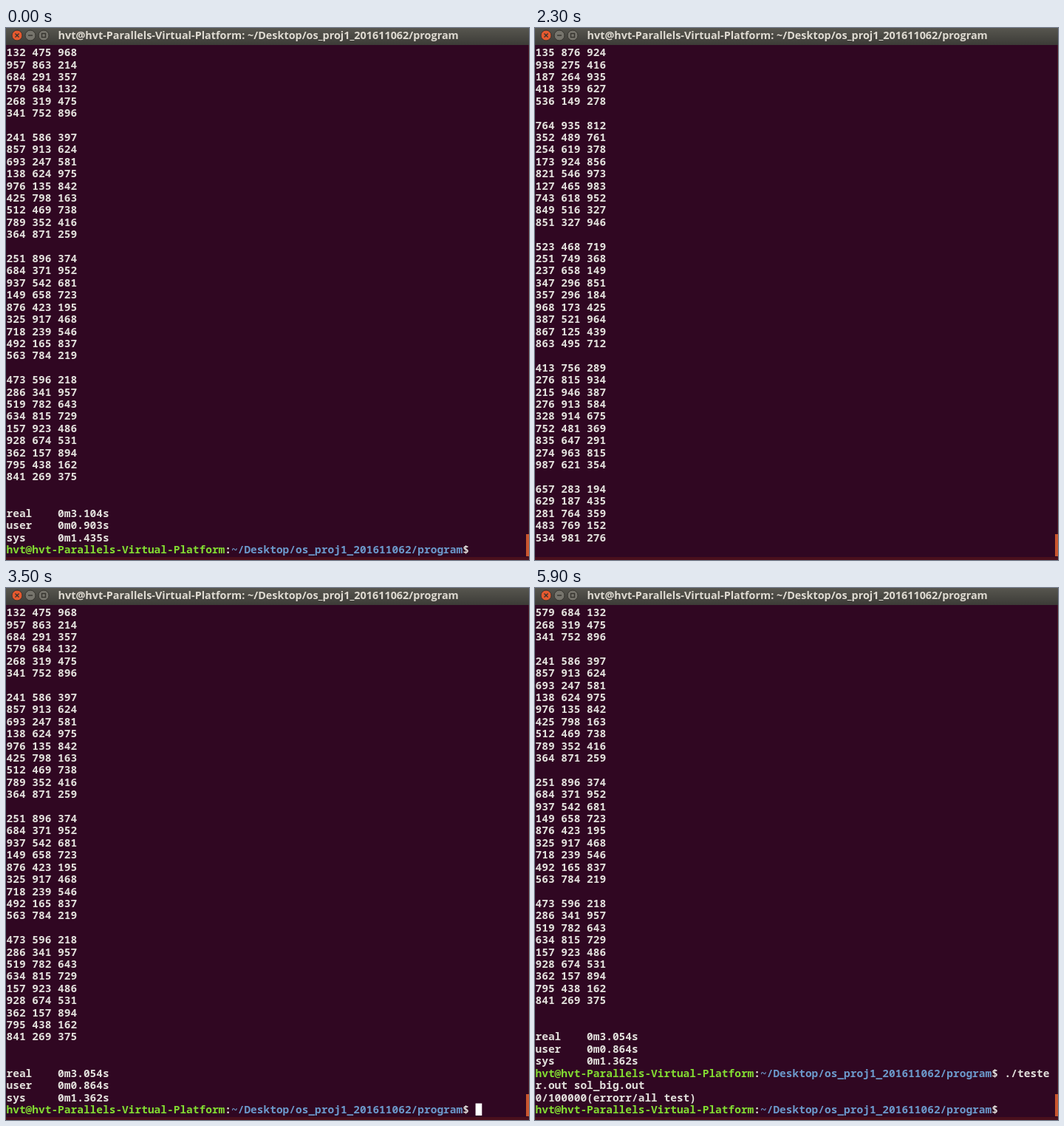
Write an HTML page with a canvas that moves like this. It is 708 px wide and 720 px high and loops after 6000 ms.

```html
<!DOCTYPE html>
<html lang="en">
<head>
<meta charset="utf-8">
<title>Terminal</title>
<style>
html, body { margin: 0; width: 100%; height: 100%; overflow: hidden; background: #300a24; }
canvas { display: block; }
</style>
</head>
<body>
<canvas id="stage" width="708" height="720"></canvas>
<script>
const ctx = document.getElementById('stage').getContext('2d');
const LOOP = 6000, STEP = 100;
const ROWS = 42, COLS = 80, CELL_W = 8.7, CELL_H = 16.41, LEFT = 0.5, TOP = 24.7;
const TEXT = '#e2e0dc', GREEN = '#83dd32', BLUE = '#6c99cb';
const MONO = '"Noto Sans Mono", "DejaVu Sans Mono", monospace';

const USER = 'hvt@hvt-Parallels-Virtual-Platform';
const FOLDER = '~/Desktop/os_proj1_201611062/program';
const PROMPT = `${USER}:${FOLDER}$ `;
const RUN = 'time ./os_proj1_201611062 <prob_big.out';
const TEST = './tester.out sol_big.out';

const solved = `132 475 968
957 863 214
684 291 357
579 684 132
268 319 475
341 752 896

241 586 397
857 913 624
693 247 581
138 624 975
976 135 842
425 798 163
512 469 738
789 352 416
364 871 259

251 896 374
684 371 952
937 542 681
149 658 723
876 423 195
325 917 468
718 239 546
492 165 837
563 784 219

473 596 218
286 341 957
519 782 643
634 815 729
157 923 486
928 674 531
362 157 894
795 438 162
841 269 375`.split('\n');

const report = (real, user, sys) => [
  ...solved, '', '',
  `real    0m${real}s`, `user    0m${user}s`, `sys     0m${sys}s`
];
const firstRun = report('3.104', '0.903', '1.435');
const secondRun = report('3.054', '0.864', '1.362');

const wrap = line => line.match(new RegExp(`.{1,${COLS}}`, 'g'));
const typed = (text, t, from, to) =>
  text.slice(0, Math.max(0, Math.floor(text.length * (t - from) / (to - from))));

function seeded(seed) {
  let s = seed * 7919 + 17;
  return () => (s = (s * 16807) % 2147483647) / 2147483647;
}

// One row of a solved grid: the digits 1 to 9 in random order
function gridRow(random) {
  const digits = [...'123456789'];
  for (let i = 8; i > 0; i--) {
    const j = Math.floor(random() * (i + 1));
    [digits[i], digits[j]] = [digits[j], digits[i]];
  }
  return digits.join('').replace(/(...)(?=.)/g, '$1 ');
}

// A screenful of the fast output: nine rows, then a blank one
function flood(t) {
  const step = t / STEP, random = seeded(step);
  const shift = Math.floor(6.9 * step + 6.3);
  const lines = [];
  for (let row = 0; row < ROWS - 1; row++) {
    const line = gridRow(random);
    lines.push((shift + row + 9) % 10 === 9 ? '' : line);
  }
  return [...lines, ''];
}

function screenLines(t) {
  if (t < 2000) return [...firstRun, ...wrap(PROMPT + typed(RUN, t, 300, 1400))];
  if (t < 3400) return flood(t);
  const command = wrap(PROMPT + typed(TEST, t, 3500, 4100));
  if (t < 4600) return [...secondRun, ...command];
  return [...secondRun, ...command, '0/100000(errorr/all test)', PROMPT];
}

function cursorOn(t) {
  const typing = (t >= 300 && t < 1500) || (t >= 3500 && t < 4300);
  return typing || (t >= 300 && t % 600 < 300);
}

function put(text, col, row, color, weight = 600) {
  ctx.font = `${weight} 14.5px ${MONO}`;
  ctx.fillStyle = color;
  ctx.fillText(text, LEFT + col * CELL_W, TOP + row * CELL_H + 13.4);
}

function drawLine(line, row) {
  if (!line.startsWith(PROMPT)) return put(line, 0, row, TEXT);
  const folderCol = USER.length + 1, endCol = folderCol + FOLDER.length;
  put(USER, 0, row, GREEN, 700);
  put(':', USER.length, row, TEXT);
  put(FOLDER, folderCol, row, BLUE, 700);
  put(line.slice(endCol), endCol, row, TEXT);
}

function box(color, x, y, w, h) {
  ctx.fillStyle = color;
  ctx.fillRect(x, y, w, h);
}

function button(x, color, symbol) {
  ctx.fillStyle = color;
  ctx.strokeStyle = '#35332e';
  ctx.lineWidth = 1;
  ctx.beginPath();
  ctx.arc(x, 10, 7, 0, Math.PI * 2);
  ctx.fill();
  ctx.stroke();
  ctx.lineWidth = 1.4;
  ctx.stroke(new Path2D(`M${x} 10${symbol}`));
}

function drawFrame() {
  const bar = ctx.createLinearGradient(0, 0, 0, 23);
  bar.addColorStop(0, '#57564f');
  bar.addColorStop(1, '#3c3b37');
  box(bar, 0, 0, 708, 23);
  button(15, '#e5592f', 'm-2.5-2.5l5 5m0-5l-5 5');
  button(33, '#76746c', 'm-3 0h6');
  button(51, '#76746c', 'm-2.5-2.5h5v5h-5z');
  ctx.font = 'bold 14.4px "Open Sans", "Noto Sans", sans-serif';
  ctx.fillStyle = '#dfdbd2';
  ctx.fillText(`${USER}: ${FOLDER}`, 70.5, 15.3);

  box('#4d1720', 707, 23, 1, 697);
  box('#4a101d', 0, 716, 708, 4);
  box('#c9562f', 704, 685, 4, 30);
}

function draw() {
  const t = Math.floor(performance.now() % LOOP / STEP) * STEP;
  box('#300722', 0, 0, 708, 720);
  const lines = screenLines(t).slice(-ROWS);
  lines.forEach(drawLine);
  if (cursorOn(t)) {
    const row = lines.length - 1;
    box('#fff', LEFT + lines[row].length * CELL_W, TOP + row * CELL_H, CELL_W, CELL_H);
  }
  drawFrame();
  requestAnimationFrame(draw);
}
draw();
</script>
</body>
</html>
```
